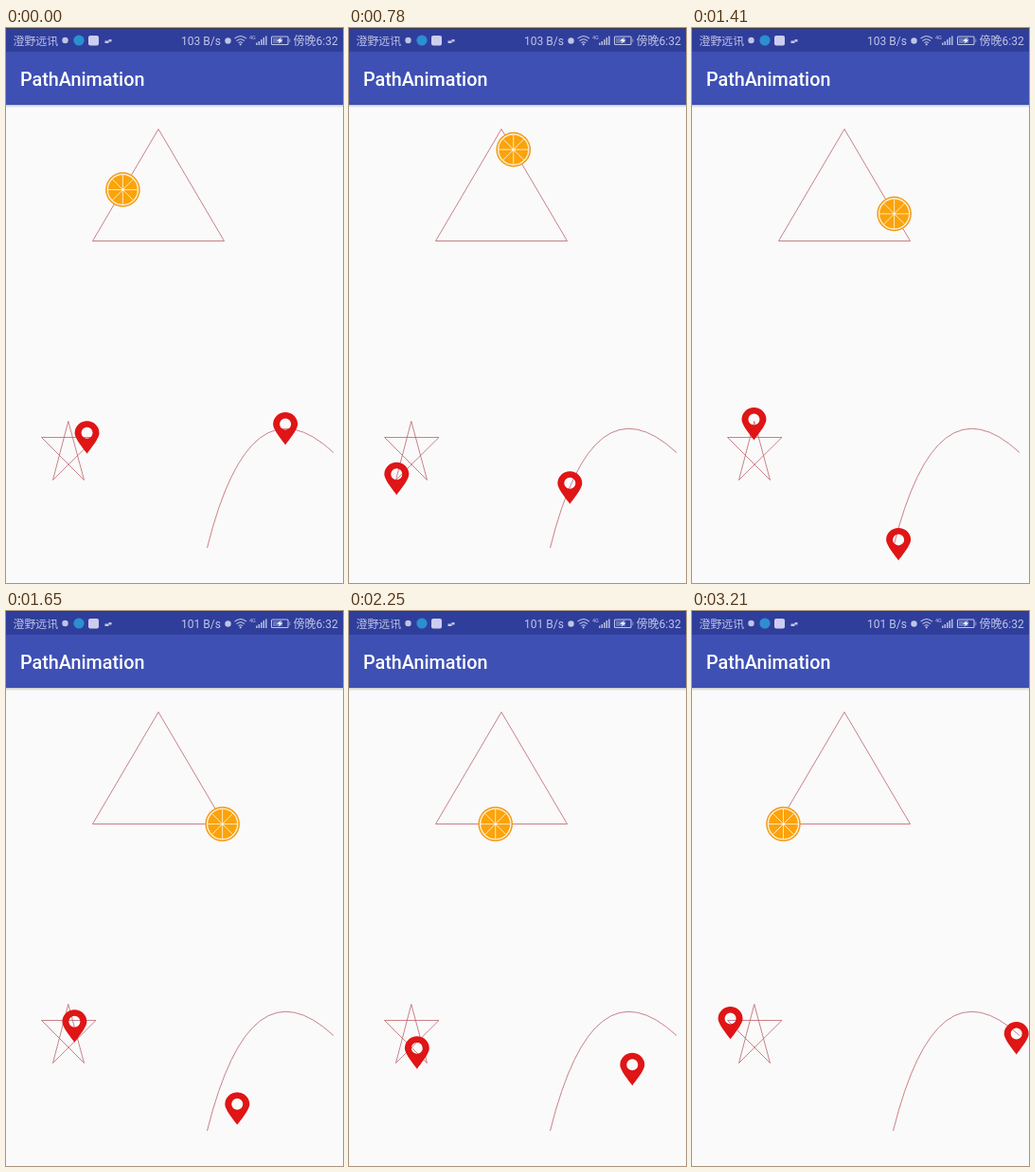
These frames come from a looping animation (356 by 585 pixels, 3310 ms). An HTML page:

```html
<!DOCTYPE html>
<html lang="zh">
<head>
<meta charset="utf-8">
<title>PathAnimation</title>
<style>
  html, body { margin: 0; width: 100%; height: 100%; overflow: hidden; background: #fafafa; }
  svg { display: block; width: 100%; height: 100%; }
  .status { font: 400 12px Roboto, "Noto Sans CJK SC", "Noto Sans CJK", sans-serif; fill: #c0c5e6; }
  .title { font: 500 19.8px Roboto, sans-serif; fill: #fff; }
  .line { fill: none; stroke: #bb626b; stroke-width: .8; }
  .icon { fill: none; stroke: #c0c5e6; stroke-width: 1.1; }
  .solid { fill: #c0c5e6; }
</style>
</head>
<body>
<svg viewBox="0 0 356 585">
  <defs>
    <linearGradient id="shade" x2="0" y2="1">
      <stop offset="0" stop-color="#000" stop-opacity=".2"/>
      <stop offset="1" stop-color="#000" stop-opacity="0"/>
    </linearGradient>
  </defs>

  <rect width="356" height="585" fill="#fafafa"/>
  <rect y="81" width="356" height="3" fill="url(#shade)"/>
  <rect width="356" height="81" fill="#3e50b3"/>
  <rect width="356" height="25" fill="#303e9b"/>
  <rect width="356" height="1" fill="#3c3c4a"/>

  <g class="status">
    <text x="7.5" y="18" style="font-size:11.9px">澄野远讯</text>
    <text id="speed" x="185" y="18">103 B/s</text>
    <text x="303.5" y="18">傍晚6:32</text>
    <text x="257" y="11.5" style="font-size:5.5px">4G</text>
  </g>
  <circle class="solid" cx="62.5" cy="13" r="3.2"/>
  <circle cx="77" cy="13" r="5.6" fill="#2b8fd0"/>
  <rect x="87" y="8" width="11" height="10.5" rx="2" fill="#cdcdf0"/>
  <path class="solid" d="M104.500 13.500h4v-1.500h3v2.500h-3v1.500h-4z"/>
  <circle class="solid" cx="234.500" cy="13.500" r="3.200"/>
  <g class="icon">
    <path d="M241.500 11.200Q247.700 5.800 254 11.200M243.500 13.600Q247.700 9.900 252 13.600M245.500 15.700Q247.700 13.800 250 15.700"/>
    <path stroke-width="1.400" d="M264.800 18v-2.500M267.300 18v-4M269.800 18v-6M272.300 18v-8M274.800 18v-9.500"/>
    <rect x="280.500" y="9" width="17.500" height="8.500" rx="1"/>
  </g>
  <path class="solid" d="M282 10.500h10v5.500h-10zM299 11.500h1.500v3.500h-1.500z" opacity=".4"/>
  <path d="M291 9.800l-5 4h3l-1.500 3 5-4.200h-3z" fill="#fff"/>
  <circle class="solid" cx="247.700" cy="17.300" r="1.100"/>

  <text class="title" x="15" y="61">PathAnimation</text>

  <path class="line" id="triangle" d="M91.500 224.500L161 106.500L230.500 224.500Z"/>
  <path class="line" id="star" d="M37.500 431.500H95L49.500 476.500L65.800 414.500L82.500 476.500Z"/>
  <path class="line" d="M346 447.500Q258 366 212.500 548"/>
  <path id="arc" fill="none" d="M346 447.500Q258 366 212.500 548Z"/>

  <g data-track="triangle">
    <circle r="18.300" fill="#f39a17"/>
    <circle r="16.100" fill="#fba30b" stroke="#fff0cf" stroke-width="1.400"/>
    <path d="M-15.500 0H15.500M0-15.500V15.500M-11-11L11 11M-11 11L11-11" stroke="#ffe9bd"/>
    <circle r="1.600" fill="#fff0cf"/>
  </g>
  <path data-track="star" class="pin"/>
  <path data-track="arc" class="pin"/>
</svg>

<script>
const LOOP = 3310;

// The picture advances in steps, a little slower after the turn.
const TURN = 13, FAST = 126.5, SLOW = 141, LAST = 24;

// [step, phase of the run], linear in between
const keys = [[0, .255], [6, .431], [11, .553], [15, .665], [17, .744], [21, .851], [24, .93]];

const PIN = 'M.4 17.2C-2.4 13-12.6 1.500-12.600-4.500A13 12.700 0 0 1 13.400-4.500' +
  'C13.400 1.500 3.200 13 .4 17.200ZM-5.600-4.700a6 6 0 1 0 12 0a6 6 0 1 0-12 0Z';

const byId = id => document.getElementById(id);
const speed = byId('speed');

for (const pin of document.querySelectorAll('.pin')) {
  pin.setAttribute('d', PIN);
  pin.setAttribute('fill', '#df1516');
  pin.setAttribute('fill-rule', 'evenodd');
}

const movers = [...document.querySelectorAll('[data-track]')].map(node => {
  const track = byId(node.dataset.track);
  return { node, track, length: track.getTotalLength() };
});

const ease = p => (1 - Math.cos(Math.PI * p)) / 2;

function stepAt(time) {
  const rest = time - TURN * FAST;
  const step = rest < 0 ? time / FAST : TURN + rest / SLOW;
  return Math.min(LAST, Math.floor(step));
}

function phaseAt(step) {
  const next = Math.max(1, keys.findIndex(([s]) => s >= step));
  const [s0, p0] = keys[next - 1], [s1, p1] = keys[next];
  return p0 + (p1 - p0) * (step - s0) / (s1 - s0);
}

function draw(time) {
  const step = stepAt(time);
  const share = ease(phaseAt(step));
  for (const { node, track, length } of movers) {
    const { x, y } = track.getPointAtLength(length * share);
    node.setAttribute('transform', `translate(${x.toFixed(2)} ${y.toFixed(2)})`);
  }
  speed.textContent = (step < TURN ? 103 : 101) + ' B/s';
}

const begin = performance.now();
function tick() {
  draw((performance.now() - begin) % LOOP);
  requestAnimationFrame(tick);
}
tick();
</script>
</body>
</html>
```
